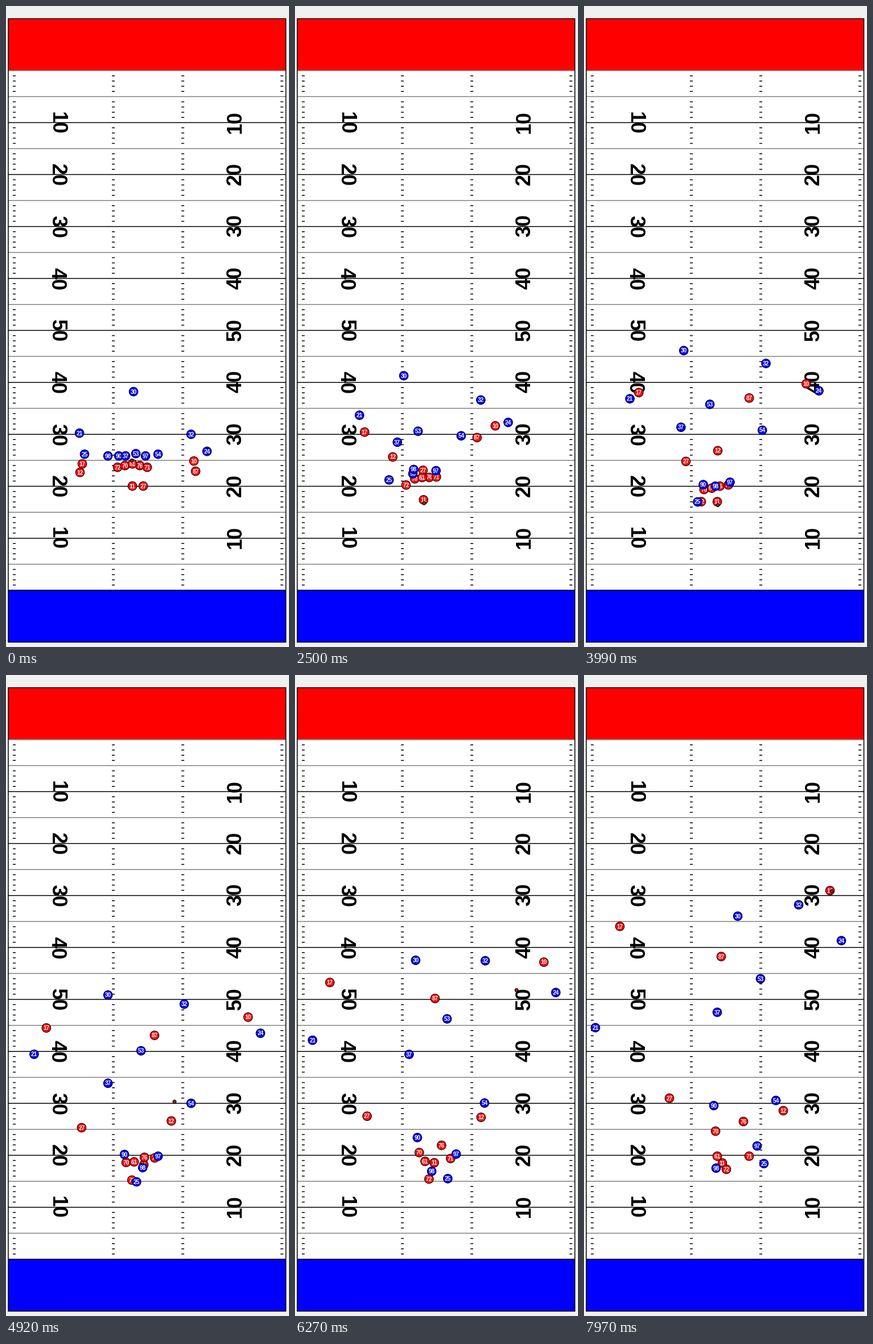
Write a matplotlib script that moves like this. It is 497x1127 px and loops after 8 s.

```python
import numpy as np
import matplotlib.pyplot as plt
from matplotlib.animation import FuncAnimation
from matplotlib.collections import LineCollection
from matplotlib.patches import Circle, Rectangle

W, H, DPI = 497, 1127, 64
LOOP, INTERVAL = 8000, 20
RED, BLUE = "#ff0000", "#0000ff"
LEFT, RIGHT, TOP, BOTTOM = 4, 491.5, 22.3, 1118.5
YARD = (BOTTOM - TOP) / 120

# The picture is refreshed at even steps after a short pause.
FIRST, STEP = 150, 124.1
# Times of a route's four points; the play starts at the first.
KEYS = np.array([1220, 3300, 4920, 7970.0])
SNAP_END, THROW, CATCH = 1140, 4050, 7000
SNAP_SPOT = np.array([221, 799])


def px(size):
    return size * 72 / DPI


def yard_y(yard):
    return TOP + YARD * yard


def spline(points, t):
    """Cubic Hermite curve through the points at KEYS."""
    t = np.clip(t, KEYS[0], KEYS[-1])
    i = min(np.searchsorted(KEYS, t, side="right") - 1, len(KEYS) - 2)
    slope = np.gradient(points, KEYS, axis=0)
    span = KEYS[i + 1] - KEYS[i]
    u = (t - KEYS[i]) / span
    return ((1 + 2 * u) * (1 - u) ** 2 * points[i]
            + u * (1 - u) ** 2 * span * slope[i]
            + u * u * (3 - 2 * u) * points[i + 1]
            + u * u * (u - 1) * span * slope[i + 1])


fig = plt.figure(figsize=(W / DPI, H / DPI), dpi=DPI, facecolor="#f0f0f0")
ax = fig.add_axes([0, 0, 1, 1])
ax.set(xlim=(0, W), ylim=(H, 0))
ax.axis("off")
font = dict(family="Liberation Sans", weight="bold")


def draw_band(first, last, color):
    ax.add_patch(Rectangle((LEFT, yard_y(first)), RIGHT - LEFT,
                           YARD * (last - first), fc=color, ec="none", zorder=0))


def draw_lines(yards, color, spans):
    segments = [[(a, yard_y(k)), (b, yard_y(k))] for k in yards for a, b in spans]
    lines = LineCollection(segments, colors=color, linewidths=px(1.5),
                           capstyle="butt", zorder=1)
    lines.set_snap(False)
    ax.add_collection(lines)


def draw_field():
    draw_band(0, 10, RED)
    draw_band(10, 110, "white")
    draw_band(110, 120, BLUE)
    full = [(LEFT, RIGHT)]
    ticks = [(x, x + 5) for x in (12, 186, 308, 482)]
    draw_lines([k for k in range(11, 110) if k % 5], "black", ticks)
    draw_lines([10, *range(15, 110, 10)], "#808080", full)
    draw_lines(range(20, 111, 10), "black", full)
    ax.add_patch(Rectangle((LEFT, TOP), RIGHT - LEFT, BOTTOM - TOP, fc="none",
                           ec="black", lw=px(1.5), snap=False, zorder=1))
    for yard in range(20, 101, 10):
        label = str(50 - abs(60 - yard))
        for x, dy, angle in ((80, 0.5, -90), (413, -1.5, 90)):
            ax.text(x, yard_y(yard) + dy, label, rotation=angle,
                    rotation_mode="anchor", ha="center", va="baseline",
                    fontsize=px(36), zorder=2, **font)


class Player:
    """A numbered disc that follows a function of time."""

    def __init__(self, number, color, path):
        z = 3 + 0.01 * len(players)
        self.path = path
        self.disc = Circle((0, 0), 7.8, fc=color, ec="black", lw=px(1), zorder=z)
        ax.add_patch(self.disc)
        self.label = ax.text(0, 0, str(number), color="white", zorder=z,
                             fontsize=px(10), ha="center", va="baseline", **font)

    def move(self, t):
        x, y = self.path(t)
        self.disc.center = x, y
        self.label.set_position((x, y + 3.6))


players = {}


def run(number, color, *points):
    points = np.array(points, float)
    players[number] = Player(number, color, lambda t: spline(points, t))


def cover(number, man, start, end):
    """A defender who slowly falls behind the man he covers."""
    start, end = np.array(start), np.array(end)

    def path(t):
        u = np.clip((t - KEYS[0]) / (KEYS[-1] - KEYS[0]), 0, 1) ** 1.4
        return players[man].path(t) + start + (end - start) * u

    players[number] = Player(number, BLUE, path)


def block(number, slot, hold, end):
    """A lineman: V-shaped formation, straight drop back, then a push."""
    line = (196 + 13 * slot, 805 + 3 * abs(slot - 2))
    drop = (198 + 13 * slot, 858 if slot == 0 else 844 - 2 * slot)
    run(number, RED, line, drop, hold, end)


draw_field()

# Quarterback, back and line
run(11, RED, (222, 844), (229, 875), (242, 861), (243, 858))
run(27, RED, (241, 844), (208, 805), (133, 796), (150, 744))
block(72, 0, (221, 888), (250, 869))
block(70, 1, (211, 857), (231, 802))
block(76, 3, (243, 848), (280, 785))
block(71, 4, (261, 849), (290, 846))
block(61, 2, (225, 856), (234, 846))

# Receivers
run(12, RED, (130, 820), (200, 783), (290, 784), (350, 766))
run(17, RED, (134, 805), (112, 715), (71, 621), (63, 442))
run(87, RED, (333, 818), (308, 724), (261, 634), (241, 495))
run(10, RED, (330, 800), (368, 701), (425, 602), (432, 379))

# Rushers
run(90, BLUE, (198, 791), (210, 835), (208, 843), (228, 757))
run(98, BLUE, (179, 791), (222, 829), (240, 866), (232, 867))
run(97, BLUE, (245, 791), (251, 829), (267, 846), (304, 828))
run(25, BLUE, (138, 788), (182, 855), (229, 891), (316, 859))

# Zone and man coverage
run(37, BLUE, (210, 791), (170, 753), (179, 718), (234, 593))
run(53, BLUE, (228, 787), (215, 724), (237, 661), (310, 534))
run(54, BLUE, (267, 788), (304, 745), (325, 753), (337, 748))
run(32, BLUE, (325, 753), (325, 659), (313, 579), (377, 404))
run(30, BLUE, (224, 678), (179, 630), (179, 563), (270, 424))
cover(21, 17, (-5, -54), (-43, 178))
cover(24, 10, (23, -17), (20, 88))

ball = Circle((0, 0), 3, fc="#8b2323", ec="black", lw=px(1), zorder=5)
ax.add_patch(ball)


def ball_at(t):
    """Snap, carry, straight throw, then carry by the receiver."""
    def passer(time):
        return players[11].path(time) + (1, 6)

    def catcher(time):
        return players[10].path(time) + (3, 1)

    if t < SNAP_END:
        u = max(0, t - FIRST) / (SNAP_END - FIRST)
        return SNAP_SPOT + (passer(SNAP_END) - SNAP_SPOT) * u
    if t < THROW:
        return passer(t)
    if t < CATCH:
        u = (t - THROW) / (CATCH - THROW)
        return passer(THROW) + (catcher(CATCH) - passer(THROW)) * u
    return catcher(t)


def update(frame):
    now = frame * INTERVAL + INTERVAL / 2
    step = np.floor((now - FIRST) / STEP)
    # Each held pose is the one at the middle of its step.
    t = FIRST + (step + 0.5) * STEP if step >= 0 else 0
    for player in players.values():
        player.move(t)
    ball.center = ball_at(t)
    return [ball]


anim = FuncAnimation(fig, update, frames=LOOP // INTERVAL, interval=INTERVAL,
                     repeat=True, repeat_delay=0)
plt.show()
```
